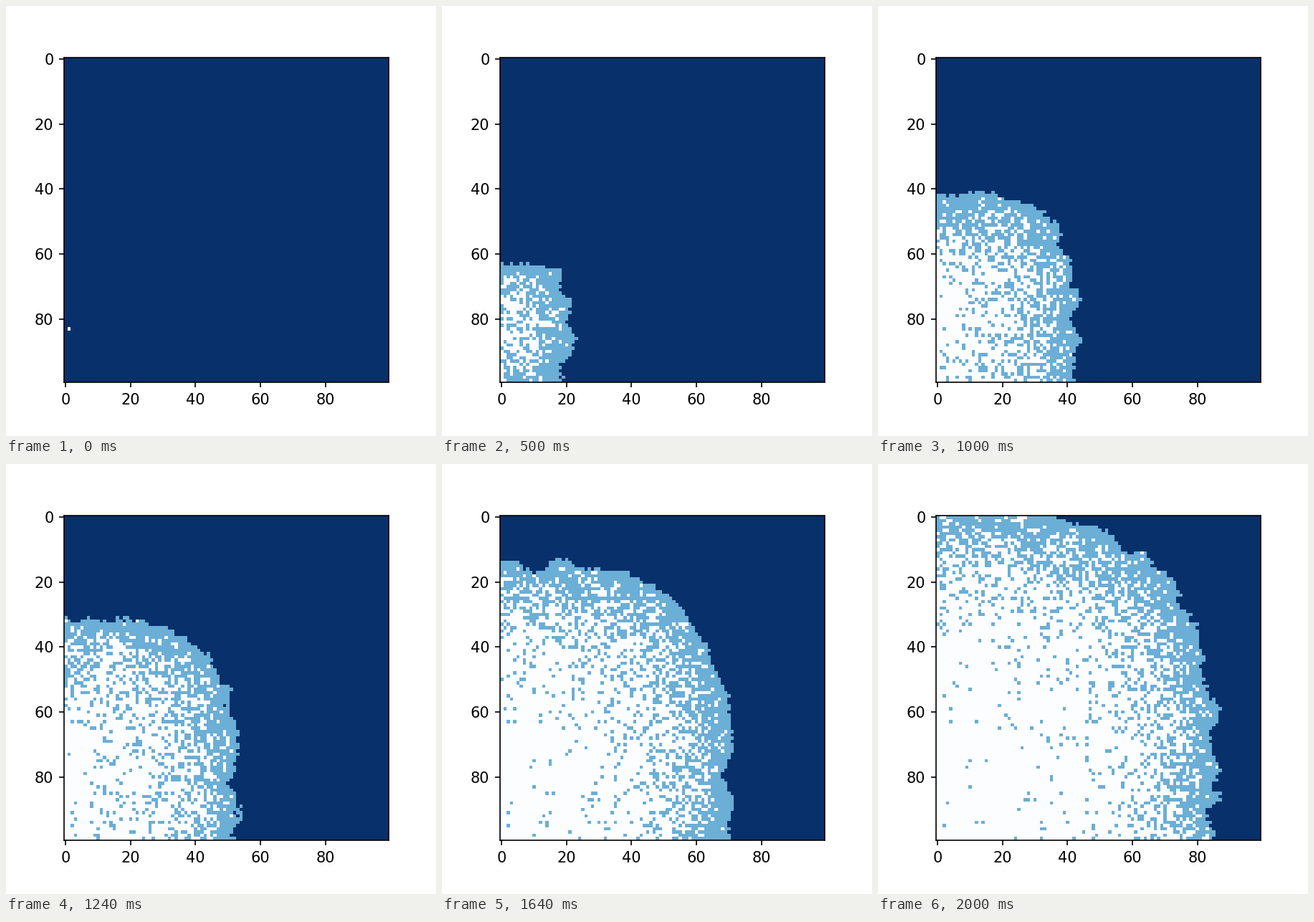
A matplotlib script that plays this animation: 600 px wide and 600 px high, repeating every 2.02 s.

```python
import numpy as np
import matplotlib.pyplot as plt
from matplotlib.animation import FuncAnimation
from matplotlib.colors import ListedColormap

SIZE, STEPS = 100, 101
SEED_ROW, SEED_COL = 83, 1
SPEED = 0.85        # cells per step
RECOVERY = 0.055    # chance per step
COLORS = ["#08306b", "#6baed6", "#fcfdff"]


def smooth_noise(rng, passes):
    """Random field with soft bumps, scaled to unit deviation."""
    field = rng.normal(size=(SIZE, SIZE))
    for _ in range(passes):
        for axis in (0, 1):
            field = (np.roll(field, 1, axis) + 2 * field
                     + np.roll(field, -1, axis)) / 4
    return field / field.std()


def infection_steps(rng):
    """Step at which each cell catches the infection."""
    rows, cols = np.mgrid[:SIZE, :SIZE]
    dx, dy = np.abs(cols - SEED_COL), np.abs(rows - SEED_ROW)
    dist = np.cbrt(dx**3 + dy**3)  # front is a rounded square
    rough = 0.9 * smooth_noise(rng, 8) + rng.uniform(-0.7, 0.7, dist.shape)
    steps = np.maximum(np.ceil(1 + (dist + rough) / SPEED), 1)
    steps[SEED_ROW, SEED_COL] = 0
    return steps


rng = np.random.default_rng(7)
infected = infection_steps(rng)
recovered = infected + rng.geometric(RECOVERY, (SIZE, SIZE))


def state(step):
    """0 = healthy, 1 = infected, 2 = recovered."""
    return (infected <= step).astype(int) + (recovered <= step)


fig, ax = plt.subplots(figsize=(4, 4), dpi=150)
fig.subplots_adjust(left=0.125, right=0.9, bottom=0.125, top=0.88)
image = ax.imshow(state(0), cmap=ListedColormap(COLORS),
                  interpolation="nearest")


def update(step):
    image.set_data(state(step))
    image.autoscale()
    return [image]


anim = FuncAnimation(fig, update, frames=STEPS, interval=20,
                     repeat=True, repeat_delay=0)
plt.show()
```
